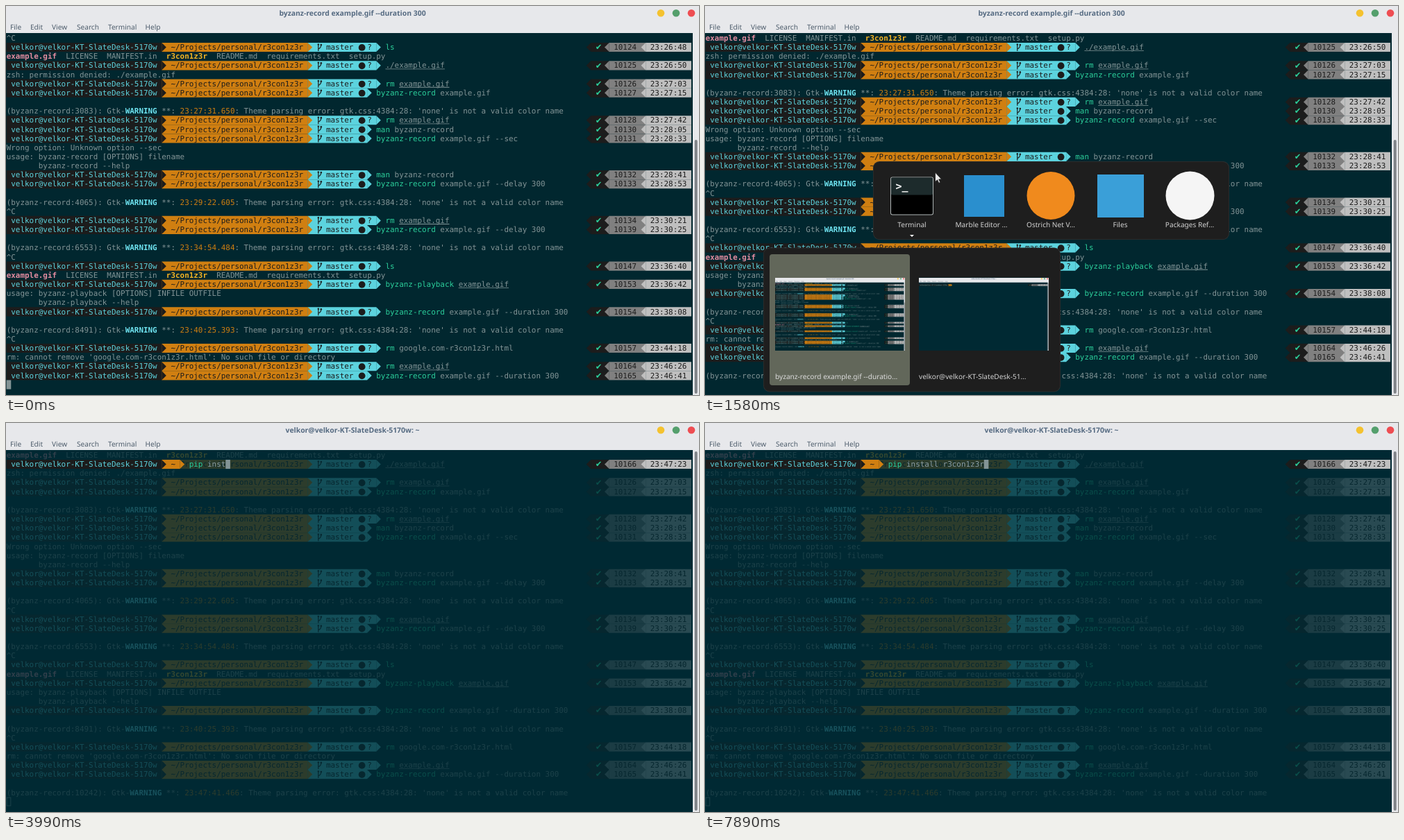
Write an HTML page with a canvas that moves like this. It is 998 px wide and 561 px high and loops after 8 s.

```html
<!DOCTYPE html>
<html lang="en">
<head>
<meta charset="utf-8">
<title>Terminal session</title>
<style>
html, body { margin: 0; width: 100%; height: 100%; overflow: hidden; background: #01272f; }
canvas { display: block; }
</style>
</head>
<body>
<canvas id="stage" width="998" height="561"></canvas>
<script>
const W = 998, H = 561, LOOP = 8000;
const CELL = 6.575, LINE = 13.15, LEFT = 0.7, TOP = 39.8;
const MONO = '"DejaVu Sans Mono", monospace', SANS = '"Noto Sans", sans-serif';
const DARK = '#1c1c1c', ORANGE = '#d07f11', CYAN = '#5cd3de', GRAY = '#839496',
      GREEN = '#2ccf9b', CHROME = '#e7e8eb', PANEL = '#1e1e1e', SELECTED = '#62675a';
const USER = 'velkor@velkor-KT-SlateDesk-5170w';
const RECORD_TITLE = 'byzanz-record example.gif --duration 300';

const colX = col => LEFT + col * CELL;
const rowY = row => TOP + row * LINE;

// A text part is [text, colour, bold, underlined].
const plain = text => ({ parts: [[text, GRAY]] });
const listing = () => ({ parts: [
  ['example.gif', '#e58ca0', true], ['  LICENSE  MANIFEST.in  ', GRAY],
  ['r3con1z3r', '#f5b324', true], ['  README.md  requirements.txt  setup.py', GRAY]
] });
const warning = (pid, time) => ({ parts: [
  [`(byzanz-record:${pid}): Gtk-`, GRAY], ['WARNING', '#6fe3f0', true], [' **: ', GRAY],
  [time, ORANGE], [": Theme parsing error: gtk.css:4384:28: 'none' is not a valid color name", GRAY]
] });
const prompt = (id, time, command, args = '', { dirty = false, file = false } = {}) => ({
  id, time, dirty,
  path: '~/Projects/personal/r3con1z3r',
  parts: [[command && args ? command + ' ' : command, GREEN], [args, GRAY, false, file]]
});
const untracked = { dirty: true }, onFile = { dirty: true, file: true };
const blank = plain('');

const lines = [
  plain('^C'),
  prompt(10124, '23:26:48', 'ls', '', untracked),
  listing(),
  prompt(10125, '23:26:50', '', './example.gif', onFile),
  plain('zsh: permission denied: ./example.gif'),
  prompt(10126, '23:27:03', 'rm', 'example.gif', onFile),
  prompt(10127, '23:27:15', 'byzanz-record', 'example.gif'),
  blank,
  warning(3083, '23:27:31.650'),
  prompt(10128, '23:27:42', 'rm', 'example.gif', onFile),
  prompt(10130, '23:28:05', 'man', 'byzanz-record'),
  prompt(10131, '23:28:33', 'byzanz-record', 'example.gif --sec'),
  plain('Wrong option: Unknown option --sec'),
  plain('usage: byzanz-record [OPTIONS] filename'),
  plain('       byzanz-record --help'),
  prompt(10132, '23:28:41', 'man', 'byzanz-record'),
  prompt(10133, '23:28:53', 'byzanz-record', 'example.gif --delay 300'),
  blank,
  warning(4065, '23:29:22.605'),
  plain('^C'),
  prompt(10134, '23:30:21', 'rm', 'example.gif', onFile),
  prompt(10139, '23:30:25', 'byzanz-record', 'example.gif --delay 300'),
  blank,
  warning(6553, '23:34:54.484'),
  plain('^C'),
  prompt(10147, '23:36:40', 'ls', '', untracked),
  listing(),
  prompt(10153, '23:36:42', 'byzanz-playback', 'example.gif', onFile),
  plain('usage: byzanz-playback [OPTIONS] INFILE OUTFILE'),
  plain('       byzanz-playback --help'),
  prompt(10154, '23:38:08', 'byzanz-record', 'example.gif --duration 300', untracked),
  blank,
  warning(8491, '23:40:25.393'),
  plain('^C'),
  prompt(10157, '23:44:18', 'rm', 'google.com-r3con1z3r.html', untracked),
  plain("rm: cannot remove 'google.com-r3con1z3r.html': No such file or directory"),
  prompt(10164, '23:46:26', 'rm', 'example.gif', onFile),
  prompt(10165, '23:46:41', 'byzanz-record', 'example.gif --duration 300'),
  blank,
  warning(10242, '23:47:41.466')
];

function rect(g, x, y, w, h, color, radius = 0) {
  g.fillStyle = color;
  g.beginPath();
  g.roundRect(x, y, w, h, radius);
  g.fill();
}
function disc(g, x, y, r, color) {
  g.fillStyle = color;
  g.beginPath();
  g.arc(x, y, r, 0, 7);
  g.fill();
}
function shape(g, color, ...points) {
  g.fillStyle = color;
  g.beginPath();
  points.forEach(p => g.lineTo(...p));
  g.closePath();
  g.fill();
}
function label(g, text, x, y, color, font = '10.1px ' + SANS, align = 'left') {
  g.font = font;
  g.textAlign = align;
  g.fillStyle = color;
  g.fillText(text, x, y);
}

function put(g, col, row, text, color, bold, underlined) {
  const font = (bold ? 'bold ' : '') + '10.92px ' + MONO;
  [...text].forEach((c, i) => {
    if (c !== ' ') label(g, c, colX(col + i), rowY(row) + 10.2, color, font);
  });
  if (underlined) rect(g, colX(col), rowY(row) + 11.3, text.length * CELL, 0.8, color);
  return col + text.length;
}
function fillCells(g, from, to, row, color) {
  rect(g, colX(from), rowY(row), (to - from) * CELL, LINE, color);
}
function arrow(g, base, tip, row, color) {
  const y = rowY(row);
  shape(g, color, [colX(base), y], [colX(tip), y + LINE / 2], [colX(base), y + LINE]);
}
function gitStatus(g, row, dirty) {
  const y = rowY(row), x = colX(68) + 2;
  g.strokeStyle = DARK;
  g.lineWidth = 1.2;
  g.beginPath();
  g.moveTo(x, y + 2);
  g.lineTo(x, y + 12);
  g.moveTo(x, y + 9);
  g.quadraticCurveTo(x + 4, y + 7.5, x + 4, y + 3);
  g.stroke();
  disc(g, x, y + 2.5, 1.2, DARK);
  disc(g, x + 4, y + 3, 1.3, DARK);
  put(g, 70, row, 'master', DARK);
  disc(g, 512.6, y + 7, 4.9, DARK);
  if (dirty) put(g, 79, row, '?', DARK);
}

// Draws both sides of a prompt and returns the column of the command.
function drawPrompt(g, row, { id, time, path, dirty, git = true }) {
  const pathEnd = 37 + path.length, gitEnd = dirty ? 81 : 79;
  fillCells(g, 0, 34, row, DARK);
  fillCells(g, 34, pathEnd, row, ORANGE);
  arrow(g, 34, 35, row, DARK);
  put(g, 1, row, USER, CYAN);
  put(g, 36, row, path, DARK);
  if (git) {
    fillCells(g, pathEnd, gitEnd, row, CYAN);
    arrow(g, gitEnd, gitEnd + 1, row, CYAN);
    gitStatus(g, row, dirty);
  }
  arrow(g, pathEnd, pathEnd + 1, row, ORANGE);

  arrow(g, 128, 127, row, DARK);
  fillCells(g, 128, 132, row, DARK);
  arrow(g, 132, 131, row, '#808080');
  fillCells(g, 132, 140, row, '#808080');
  arrow(g, 140, 139, row, '#bfbfbf');
  fillCells(g, 140, 150, row, '#bfbfbf');
  label(g, '✔', 853.5, rowY(row) + 10.4, GREEN, '11.5px "DejaVu Sans", sans-serif', 'center');
  put(g, 133, row, String(id), DARK);
  put(g, 141, row, time, DARK);
  return (git ? gitEnd : pathEnd) + 2;
}

function drawWindow(g, title, body, thumbTop) {
  rect(g, 0, 39, W, H - 39, body);
  rect(g, 0, 0, W, 39, CHROME);
  label(g, title, W / 2, 14, '#566b82', 'bold 10.4px ' + SANS, 'center');
  const menu = { File: 6, Edit: 35, View: 66, Search: 102, Terminal: 147, Help: 200.5 };
  for (const name in menu) label(g, name, menu[name], 33.5, '#4d5c6b');
  ['#f4c22f', '#549f6c', '#ee4d52'].forEach((c, i) => disc(g, 943 + 22 * i, 10.3, 5.3, c));
  rect(g, 989, 39, 9, H - 39, CHROME);
  rect(g, 991.7, thumbTop, 4, 559 - thumbTop, '#7f8287', 2);
}

function context(canvas) {
  const g = canvas.getContext('2d');
  g.textRendering = 'geometricPrecision';
  return g;
}
function layer(draw) {
  const canvas = document.createElement('canvas');
  canvas.width = W;
  canvas.height = H;
  draw(context(canvas));
  return canvas;
}
const recorder = scroll => layer(g => {
  drawWindow(g, RECORD_TITLE, '#01272f', 193);
  lines.slice(scroll, scroll + 38).forEach((line, row) => {
    let col = line.id ? drawPrompt(g, row, line) : 0;
    for (const [text, ...style] of line.parts) col = put(g, col, row, text, ...style);
  });
});
const before = recorder(0), after = recorder(2);
const shell = layer(g => {
  drawWindow(g, USER + ': ~', 'rgba(0, 43, 53, 0.79)', 41);
  drawPrompt(g, 1, { id: 10166, time: '23:47:23', path: '~', git: false });
});

const apps = ['Terminal', 'Marble Editor …', 'Ostrich Net V…', 'Files', 'Packages Ref…'];

function drawSwitcher(g, selected, tick) {
  rect(g, 242, 224, 513, 113, '#303030', 9);
  rect(g, 242.7, 224.7, 511.6, 111.6, PANEL, 9);
  if (selected >= 0) rect(g, 251 + 100 * selected, 233, 94.5, 94, SELECTED, 4);
  rect(g, 267, 246.5, 62, 55, '#aeb5b5', 3);
  rect(g, 268, 247.5, 60, 53, '#000', 2);
  rect(g, 268, 247.5, 60, 25, '#1d2b2c', 2);
  label(g, '>_', 274.5, 265, '#fff', 'bold 15px ' + MONO);
  rect(g, 373, 244, 58, 60, '#2a8fce');
  disc(g, 498, 273.5, 34.5, '#f08a1d');
  rect(g, 565, 243, 67, 62, '#3a9fd8');
  disc(g, 698.5, 273.5, 35, '#f5f5f5');
  apps.forEach((name, i) => label(g, name, 298 + 100 * i, 319, '#d3d3d3', undefined, 'center'));
  shape(g, tick, [295, 330], [301, 330], [298, 333]);
}

function drawPreviews(g, selected) {
  rect(g, 84, 348.5, 428, 208, '#303030', 9);
  rect(g, 84.7, 349.2, 426.6, 206.6, PANEL, 9);
  rect(g, 93 + 207.5 * selected, 358, 202, 189, SELECTED, 4);
  g.imageSmoothingQuality = 'high';
  g.drawImage(after, 101, 391.5, 187, 105);
  rect(g, 308, 391.5, 187, 105, '#01272f');
  g.drawImage(shell, 308, 391.5, 187, 105);
  label(g, 'byzanz-record example.gif --duratio…', 101, 537.5, '#dcdcdc');
  label(g, USER.slice(0, -3) + '…', 308, 537.5, '#d3d3d3');
}

function drawBeam(g) {
  g.strokeStyle = '#cfd6d6';
  g.lineWidth = 1.4;
  g.beginPath();
  g.moveTo(328, 233);
  g.lineTo(335.5, 233);
  g.moveTo(328, 246.5);
  g.lineTo(335.5, 246.5);
  g.moveTo(331.7, 233);
  g.lineTo(331.7, 246.5);
  g.stroke();
}
function drawArrow(g) {
  const tip = [[331.5, 240], [331.5, 253.5], [334.6, 250.8], [336.8, 255.3],
               [338.8, 254.3], [336.7, 250], [340.5, 249.7]];
  shape(g, '#e6e6e6', ...tip);
  g.strokeStyle = '#222';
  g.lineWidth = 0.8;
  g.stroke();
}

const COMMAND = 'pip install r3con1z3r';
const keyTimes = [2300, 3160, 3280, 3480, 3680, 3780, 3890, 3990, 4210, 4330, 4500, 4570,
                  5220, 5380, 5740, 5910, 5980, 6650, 7320, 7570, 7890];
const blinks = [[2960, 3160], [5140, 5220], [6550, 6650], [7260, 7320]];

function drawTyping(g, t) {
  const typed = COMMAND.slice(0, keyTimes.filter(k => t >= k).length);
  put(g, 40, 1, typed.slice(0, 3), typed.length < 3 ? '#dc4a45' : GREEN);
  put(g, 43, 1, typed.slice(3), '#8f9fa1');
  if (!blinks.some(([off, on]) => t >= off && t < on)) {
    fillCells(g, 40 + typed.length, 41 + typed.length, 1, GRAY);
  }
}

// Value of the last [time, value] step reached.
const step = (t, steps) => steps.filter(s => t >= s[0]).pop()[1];

const g = context(document.getElementById('stage'));

function render(t) {
  const switched = t >= 1910;
  g.drawImage(t < 60 ? before : after, 0, 0);
  if (switched) {
    g.strokeStyle = GRAY;
    g.lineWidth = 1;
    g.strokeRect(1.2, rowY(38) + 0.7, 5.6, 11.8);
    g.drawImage(shell, 0, 0);
    drawTyping(g, t);
  } else if (t < 410 || (t >= 1020 && t < 1520)) {
    fillCells(g, 0, 1, 38, GRAY);
  }

  const fade = step(t, [[0, 0], [970, 1], [1910, 0.6], [1960, 0.25], [2020, 0]]);
  if (fade) {
    g.globalAlpha = fade;
    drawSwitcher(g, step(t, [[0, 1], [1270, 0], [1470, -1]]), t < 1270 ? '#444' : '#fff');
    g.globalAlpha = fade * step(t, [[0, 0], [1470, 0.35], [1520, 0.7], [1580, 1]]);
    if (t >= 1470) drawPreviews(g, t < 1630 ? 0 : 1);
    g.globalAlpha = 1;
  }

  if (t >= 970 && t < 2020) drawArrow(g);
  else if (t >= 620 && t < 2300) drawBeam(g);
}

const start = performance.now();
function tick() {
  render((performance.now() - start) % LOOP);
  requestAnimationFrame(tick);
}
tick();
</script>
</body>
</html>
```
